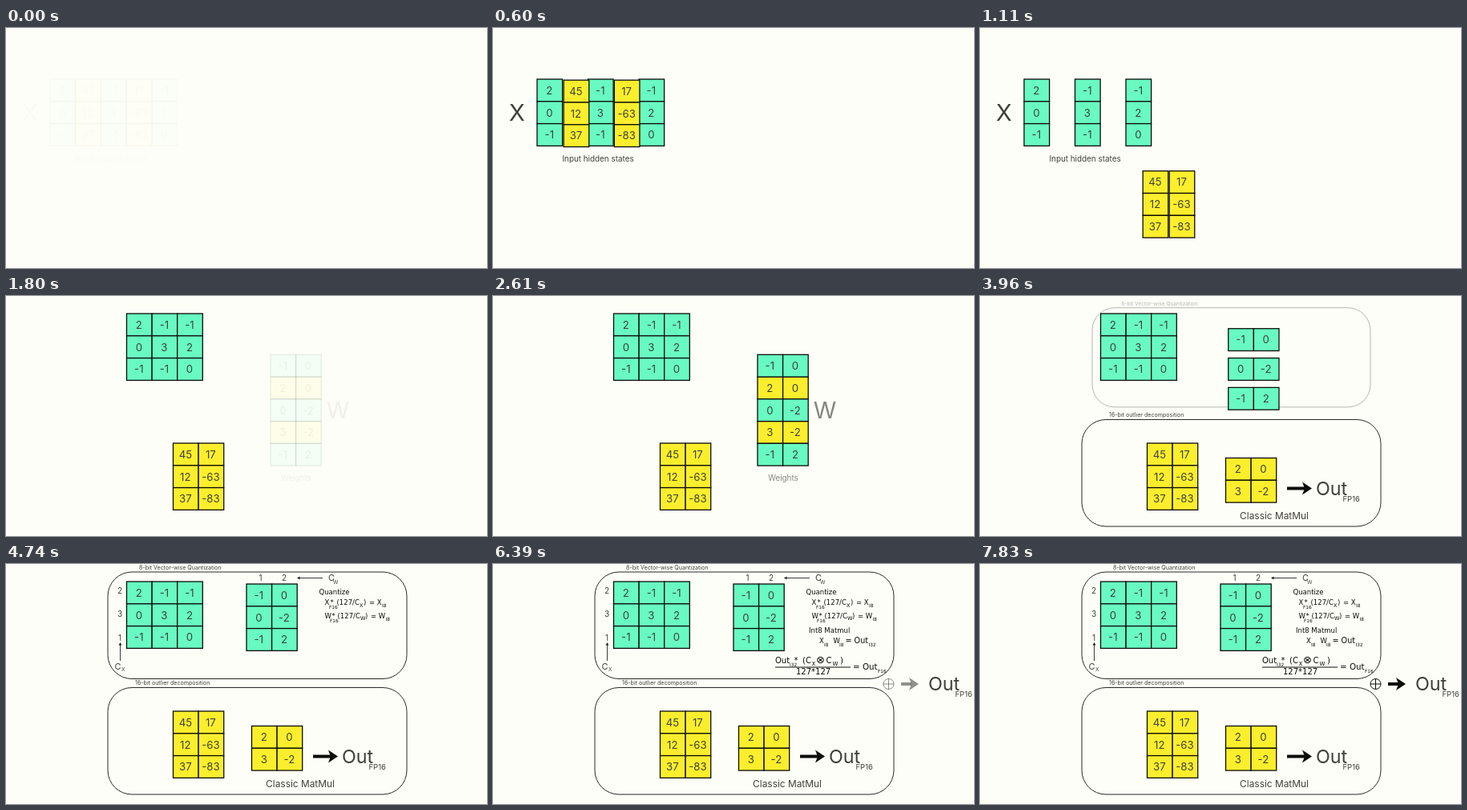
An HTML page with a canvas that plays this animation: 600x300 px, repeating every 7.86 s.

```html
<!DOCTYPE html>
<html lang="en">
<head>
<meta charset="utf-8">
<title>Mixed precision matrix multiplication</title>
<style>
html, body { margin: 0; width: 100%; height: 100%; overflow: hidden; background: #fefef8; }
canvas { display: block; }
</style>
</head>
<body>
<canvas id="stage" width="600" height="300"></canvas>
<script>
const ctx = document.getElementById('stage').getContext('2d');
const LOOP = 7860, CELL_W = 31.6, CELL_H = 27.8;
const PAPER = '#fefef8', GREEN = '#68fac2', YELLOW = '#fbee2c', INK = '#40403a', LINE = '#0c0c08';
const SANS = 'Inter, "Liberation Sans", sans-serif';
const MATH = '"DejaVu Sans", sans-serif';

const clamp = v => Math.max(0, Math.min(1, v));
const linear = (t, from, to) => clamp((t - from) / (to - from));
const ease = (t, from, to) => { const u = linear(t, from, to); return u * u * (3 - 2 * u); };
const mix = (a, b, u) => a + (b - a) * u;

function text(str, x, y, size, { font = SANS, align = 'left', color = INK } = {}) {
  ctx.font = `${size}px ${font}`;
  ctx.textAlign = align;
  ctx.fillStyle = color;
  ctx.fillText(str, x, y);
}

const math = (str, x, y, size = 8.5) => text(str, x, y, size, { font: MATH, color: LINE });

function fade(alpha, draw) {
  if (alpha <= 0) return;
  ctx.save();
  ctx.globalAlpha = alpha;
  draw();
  ctx.restore();
}

function line(x1, y1, x2, y2, width = 1) {
  ctx.strokeStyle = LINE;
  ctx.lineWidth = width;
  ctx.beginPath();
  ctx.moveTo(x1, y1);
  ctx.lineTo(x2, y2);
  ctx.stroke();
}

function head(x, y, angle, length, half) {
  ctx.save();
  ctx.translate(x, y);
  ctx.rotate(angle);
  ctx.fillStyle = LINE;
  ctx.beginPath();
  ctx.moveTo(0, 0);
  ctx.lineTo(-length, -half);
  ctx.lineTo(-length * 0.75, 0);
  ctx.lineTo(-length, half);
  ctx.fill();
  ctx.restore();
}

function thickArrow(x1, x2, y) {
  line(x1, y, x2 - 9, y, 4);
  head(x2, y, 0, 12, 8);
}

// A strip of cells travelling from one corner to another.
function strip(values, color, vertical, from, to, u) {
  const x = mix(from[0], to[0], u), y = mix(from[1], to[1], u);
  values.forEach((value, i) => {
    const cx = x + (vertical ? 0 : i * CELL_W), cy = y + (vertical ? i * CELL_H : 0);
    ctx.fillStyle = color;
    ctx.fillRect(cx, cy, CELL_W, CELL_H);
    ctx.strokeStyle = LINE;
    ctx.lineWidth = 1.3;
    ctx.strokeRect(cx, cy, CELL_W, CELL_H);
    text(value, cx + 15.3, cy + 18.7, 13.2, { align: 'center' });
  });
}

// Rounded panel that grows into place around its centre.
function panel(u, alpha, y, title, titleX, titleY, caption) {
  fade(alpha, () => {
    const cx = 313.5, cy = y + 67, s = mix(0.8, 1, u);
    ctx.translate(cx, cy);
    ctx.scale(s, s);
    ctx.translate(-cx, -cy);
    ctx.strokeStyle = '#2a2a24';
    ctx.lineWidth = 1;
    ctx.beginPath();
    ctx.roundRect(127, y, 373, 133.5, 30);
    ctx.stroke();
    text(title, titleX, titleY, 7.1);
    if (caption) text(caption, 367, 279, 11.9, { align: 'center' });
  });
}

function output(x, y) {
  text('Out', x, y, 23.3);
  text('FP16', x + 33.5, y + 7.5, 9.5);
}

function inputs(t) {
  const shown = linear(t, -10, 520), outliers = ease(t, 565, 1190), join = ease(t, 1155, 1765);
  fade(shown, () => {
    [['2', '0', '-1'], ['-1', '3', '-1'], ['-1', '2', '0']].forEach((col, i) =>
      strip(col, GREEN, true, [55 + i * 63.5, 64], [150.5 + i * CELL_W, 22], join));
    [['45', '12', '37'], ['17', '-63', '-83']].forEach((col, i) =>
      strip(col, YELLOW, true, [87 + i * 63.5, 64], [208.5 + i * CELL_W, 184], outliers));
  });
  fade(shown * (1 - linear(t, 1160, 1720)), () => {
    text('X', 30, 116, 29, { align: 'center' });
    text('Input hidden states', 131, 167, 9.9, { align: 'center' });
  });
}

function weights(t) {
  const shown = linear(t, 1760, 2300), outliers = ease(t, 2970, 3575), join = ease(t, 3590, 4190);
  fade(shown, () => {
    [['2', '0'], ['3', '-2']].forEach((row, i) =>
      strip(row, YELLOW, false, [330, 101 + i * 55.5], [306.5, 202.5 + i * CELL_H], outliers));
    [['-1', '0'], ['0', '-2'], ['-1', '2']].forEach((row, i) =>
      strip(row, GREEN, false, [330, 73.3 + i * 55.5], [300, 25 + i * CELL_H], join));
  });
  fade(shown * (1 - linear(t, 2420, 2940)), () => {
    text('W', 414, 153, 29, { align: 'center' });
    text('Weights', 362, 231, 9.9, { align: 'center' });
  });
}

function scales() {
  ['2', '3', '1'].forEach((n, i) => text(n, 142, 36.5 + i * 29.7, 10, { align: 'center' }));
  ['1', '2'].forEach((n, i) => text(n, 317.5 + i * 29.5, 20.5, 10, { align: 'center' }));
  line(395, 17.5, 366, 17.5, 0.8);
  head(363, 17.5, Math.PI, 4, 2);
  text('C', 402, 21, 11);
  text('W', 408, 25, 6.5);
  line(142.5, 121, 142.5, 101, 0.8);
  head(142.5, 98, -Math.PI / 2, 4, 2);
  text('C', 135.5, 132, 11);
  text('X', 144, 134, 6.5);
}

function quantize() {
  math('Quantize', 390.5, 38);
  ['X', 'W'].forEach((name, i) => {
    const y = 51 + i * 16.5, dx = i * 2;
    math(name, 397.5, y);
    math('F16', 403 + i, y + 5, 5.8);
    math('*', 404.5 + dx, y);
    math('(127/C', 412.5 + i, y);
    math(name, 441 + i, y + 2.5, 6.5);
    math(')', 446 + dx, y);
    math('= ' + name, 453 + dx, y);
    math('I8', 469 + i * 4.5, y + 3, 5.8);
  });
}

function multiply() {
  math('Int8 Matmul', 394, 86);
  math('X', 407, 99);
  math('I8', 413, 102.5, 5.8);
  math('W', 424.5, 99);
  math('I8', 432, 102.5, 5.8);
  math('= Out', 439.5, 99, 9.6);
  math('I32', 468.5, 103, 5.8);
}

function dequantize() {
  math('Out', 352, 123.5, 10);
  math('I32', 370, 127.5, 5.8);
  math('*', 375.5, 123.5, 10);
  math('(C', 386, 123.5, 10);
  math('X', 397.5, 127, 7);
  math('⊗', 403, 124, 13);
  math('C', 415.5, 123.5, 10);
  math('W', 423.5, 127, 7);
  math(')', 433, 123.5, 10);
  line(352, 129, 446, 129);
  math('127*127', 378, 138, 10);
  math('= Out', 449, 131.5, 10.3);
  math('F16', 480, 136, 5.8);
}

function sum() {
  ctx.strokeStyle = LINE;
  ctx.lineWidth = 1;
  ctx.beginPath();
  ctx.arc(493.5, 150, 6.5, 0, Math.PI * 2);
  ctx.stroke();
  line(487, 150, 500, 150);
  line(493.5, 143.5, 493.5, 156.5);
  thickArrow(509, 531, 150);
}

function render(t) {
  ctx.fillStyle = PAPER;
  ctx.fillRect(0, 0, 600, 300);
  const classic = linear(t, 3130, 3720);
  panel(ease(t, 2955, 3550), classic, 154.5, '16-bit outlier decomposition', 161, 151, 'Classic MatMul');
  panel(ease(t, 3600, 4200), linear(t, 3770, 4300), 10, '8-bit Vector-wise Quantization', 166, 7);
  inputs(t);
  weights(t);
  fade(classic, () => {
    thickArrow(383, 414, 240.5);
    output(419, 249);
  });
  fade(linear(t, 4180, 4650), scales);
  fade(linear(t, 4240, 4720), quantize);
  fade(linear(t, 4830, 5320), multiply);
  fade(linear(t, 5420, 5900), dequantize);
  fade(linear(t, 6120, 6720), sum);
  fade(linear(t, 5800, 6380), () => output(543, 158));
}

const start = performance.now();
function tick() {
  render((performance.now() - start) % LOOP);
  requestAnimationFrame(tick);
}
tick();
</script>
</body>
</html>
```
